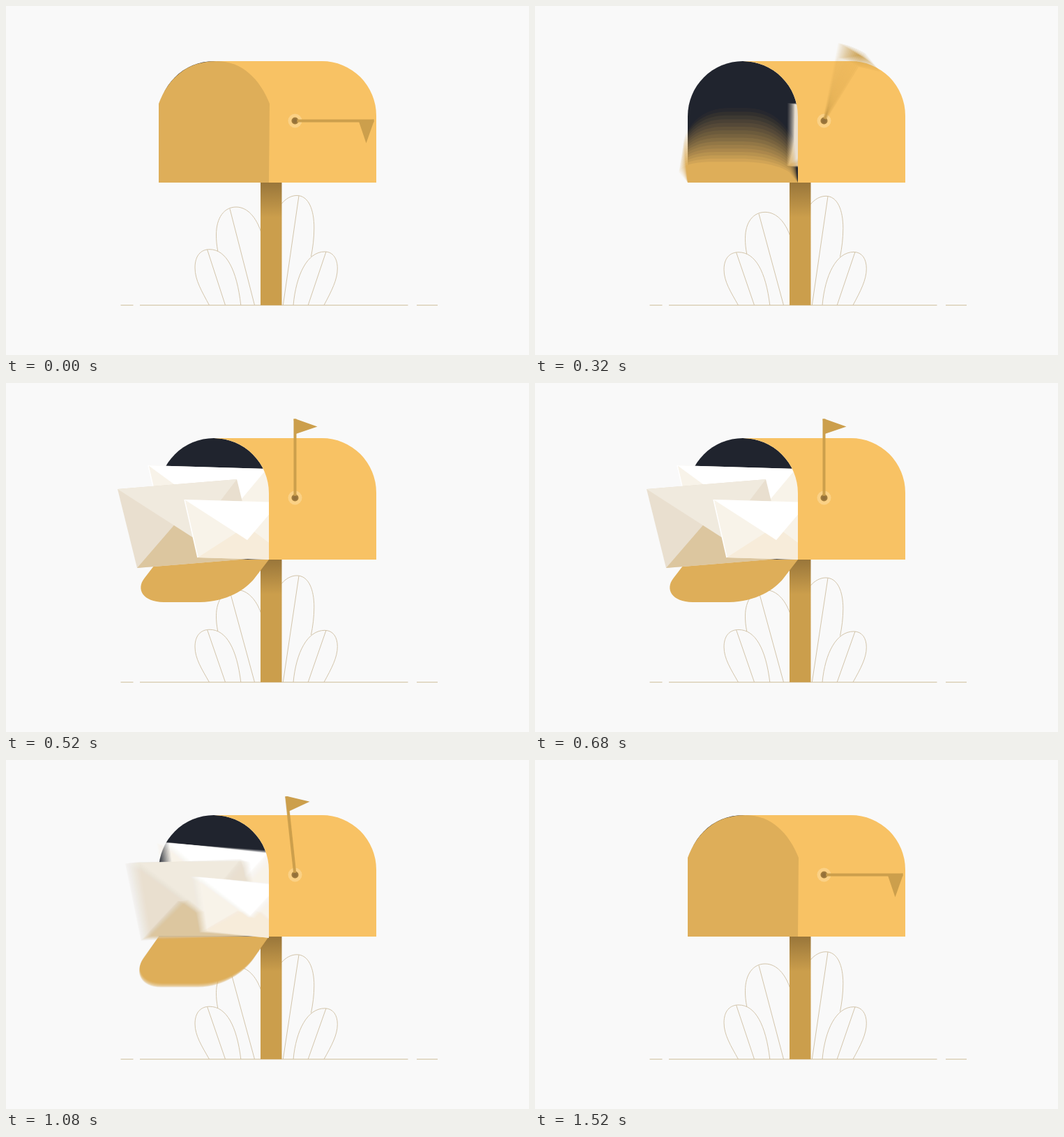
An HTML page with a canvas for the animation above (1560 ms loop, 750 by 500 pixels).

```html
<!DOCTYPE html>
<html lang="en">
<head>
<meta charset="utf-8">
<title>Mailbox</title>
<style>
html, body { margin: 0; height: 100%; overflow: hidden; background: #f9f9f9; }
canvas { display: block; width: 100vw; height: 100vh; }
</style>
</head>
<body>
<canvas id="stage" width="750" height="500"></canvas>
<script>
const LOOP = 1560, STEP = 40, SHUTTER = 12, SAMPLES = 16;
const GROUND = 428.7, HINGE = 253;
const view = document.getElementById('stage').getContext('2d');
const buffer = document.createElement('canvas');
buffer.width = 750;
buffer.height = 500;
const g = buffer.getContext('2d');

const clamp = v => Math.max(0, Math.min(1, v));
const rad = deg => deg * Math.PI / 180;

// Rises from 0 to 1 at time a, falls back at time b
const ramp = (t, a, b, span) => clamp(Math.min((t - a) / span, 1 - (t - b) / span));

// Ramp that swings past 1 before it rests there
function swing(t, a, b, over) {
  const w = 1 - ramp(t, a, b, 100);
  return 1 - w * w * ((over + 1) * w - over);
}

const flagUp = t => swing(t, 295, 1040, 1.4);
const lidOpen = t => swing(t, 300, 1040, 1);
const mailOut = t => {
  const u = ramp(t, 309, 1064, 110);
  return u * u * (3 - 2 * u);
};

const leftSway = t => .95 * Math.sin(Math.PI * t / LOOP) ** .3;
const rightSway = t => (1 - Math.cos(2 * Math.PI * t / 293)) / 2;

const leaves = [
  { top: 348.7, drop: 5, vein: [288.5, 348.7, 314.5], sway: leftSway,
    d: 'M291.5 428.7C281 409 271 393 271 375C271 358 279 348.7 292 348.7C316 348.7 331 378 336.8 428.7' },
  { top: 288, drop: 9, vein: [321, 290.5, 356.5], sway: leftSway,
    d: 'M303.8 351.5C302 342 301.5 335 301.5 328C301.5 303 313 288 330 288C347 288 359 304 365.5 323' },
  { top: 271.5, drop: 10.5, vein: [420, 271.8, 397.3], sway: rightSway,
    d: 'M395 283.5C401 276 409 271.5 417 271.5C434 271.5 441.8 292 441.8 318C441.8 333 440 346 437.5 359' },
  { top: 352, drop: 5.5, vein: [459, 352, 433.2], sway: rightSway,
    d: 'M412 428.7C416 385 432 352 457 352C469 352 475.3 362 475.3 376C475.3 392 467 408 456 428.7' }
];

const side = new Path2D('M298 79H453A78 78 0 0 1 531 157V253H377V158A79 79 0 0 0 298 79Z');
const mouth = new Path2D('M219 253V158A79 79 0 0 1 377 158V253Z');

// Corners: top left, top right, bottom left; tip of the flap, peak of the lower fold
const letters = [
  { tl: [204, 118], tr: [374, 123], bl: [228, 222], tip: [312, 197], peak: [303, 180],
    base: '#f8f3e9', fold: '#f7ead6', flap: '#fff', rim: true },
  { tl: [160, 152], tr: [331, 138], bl: [188, 265], tip: [267.5, 221], peak: [252, 191],
    base: '#e9dfcf', fold: '#dcc69f', flap: '#f0eade' },
  { tl: [256, 167], tr: [392, 171], bl: [275, 250], tip: [346, 225], peak: [345, 205],
    base: '#f8f3e9', fold: '#f7ecda', flap: '#fff', rim: true }
];

function fill(color, path) {
  g.fillStyle = color;
  g.fill(path);
}

function poly(color, ...pts) {
  const p = new Path2D();
  pts.forEach(([x, y]) => p.lineTo(x, y));
  p.closePath();
  fill(color, p);
}

function line(x1, y1, x2, y2) {
  g.beginPath();
  g.moveTo(x1, y1);
  g.lineTo(x2, y2);
  g.stroke();
}

function disc(color, x, y, r) {
  const p = new Path2D();
  p.arc(x, y, r, 0, 7);
  fill(color, p);
}

function drawLeaf({ top, drop, vein, sway, d }, t) {
  const k = 1 - drop * sway(t) / (GROUND - top);
  const p = new Path2D();
  p.addPath(new Path2D(d), new DOMMatrix([1, 0, 0, k, 0, GROUND * (1 - k)]));
  g.stroke(p);
  line(vein[0], GROUND + (vein[1] - GROUND) * k, vein[2], GROUND);
}

function drawGround(t) {
  g.lineWidth = 1;
  g.strokeStyle = '#d3c5ab';
  for (const leaf of leaves) drawLeaf(leaf, t);
  g.strokeStyle = '#cebd9b';
  for (const [a, b] of [[164.5, 182.5], [192, 576.5], [589, 619]]) line(a, GROUND, b, GROUND);

  const shade = g.createLinearGradient(0, HINGE, 0, 303);
  shade.addColorStop(0, '#99763a');
  shade.addColorStop(1, '#cb9e4c');
  g.fillStyle = shade;
  g.fillRect(365, HINGE, 30.5, GROUND - HINGE);
}

// The lid turns about its lower edge and gets squarer as it opens
function drawLid(open) {
  const m = clamp(open), mix = (a, b) => a + (b - a) * m;
  const skew = -.263 * open * open, rise = Math.cos(rad(110 * open));
  const top = mix(79, 75), shoulder = mix(140, 174), bend = mix(105, 129), lean = mix(13, 0);
  g.save();
  g.transform(1, 0, -skew, rise, HINGE * skew, HINGE * (1 - rise));
  g.beginPath();
  g.moveTo(219, HINGE);
  g.lineTo(219, shoulder);
  g.bezierCurveTo(219 + lean, bend, mix(258, 243), top, mix(302, 273), top);
  g.lineTo(mix(302, 325), top);
  g.bezierCurveTo(mix(339, 363), top, 377 - lean, bend, mix(378, 377), shoulder);
  g.lineTo(377, HINGE);
  g.fillStyle = '#deae59';
  g.fill();
  g.restore();
}

function drawLetter({ tl, tr, bl, tip, peak, base, fold, flap, rim }) {
  const br = [tr[0] + bl[0] - tl[0], tr[1] + bl[1] - tl[1]];
  poly(base, tl, tr, br, bl);
  poly(fold, bl, peak, br);
  poly(flap, tl, tr, tip);
  if (rim) {
    g.strokeStyle = '#fff';
    g.lineWidth = 1.5;
    line(...tl, ...bl);
  }
}

// Letters slide out from behind the side, growing and turning
function drawLetters(out) {
  const hidden = Math.sqrt(1 - out), size = 1 - .24 * hidden;
  g.save();
  g.beginPath();
  g.rect(0, 0, 377, 500);
  g.clip();
  g.translate(290 + 170 * (1 - out), 200);
  g.rotate(rad(15 * hidden));
  g.scale(size, size);
  g.translate(-290, -200);
  letters.forEach(drawLetter);
  g.restore();
}

function drawFlag(up) {
  const color = '#cc9f4c';
  g.save();
  g.translate(414.5, 164.5);
  disc('#fbd185', 0, 0, 10);
  disc('#a07a3c', 0, 0, 5);
  g.rotate(-up * Math.PI / 2);
  g.fillStyle = color;
  g.fillRect(1, -2, 112, 4);
  poly(color, [113, -2], [113, 1], [102, 32], [91.5, 1]);
  disc('#93703a', 0, 0, 3);
  g.restore();
}

function drawScene(t, groundTime) {
  const open = lidOpen(t), lowered = open > .82;
  g.fillStyle = '#f9f9f9';
  g.fillRect(0, 0, 750, 500);
  drawGround(groundTime);
  fill('#20242e', mouth);
  if (lowered) drawLid(open);
  drawLetters(mailOut(t));
  fill('#f8c264', side);
  if (!lowered) drawLid(open);
  drawFlag(flagUp(t));
}

// Average several moments across the shutter for motion blur
function render(t) {
  for (let i = 0; i < SAMPLES; i++) {
    drawScene(t + SHUTTER * ((i + .5) / SAMPLES - .5), t);
    view.globalAlpha = 1 / (i + 1);
    view.drawImage(buffer, 0, 0);
  }
}

const start = performance.now();
let shown = -1;
function tick() {
  const t = Math.floor((performance.now() - start) % LOOP / STEP) * STEP;
  if (t !== shown) render(shown = t);
  requestAnimationFrame(tick);
}
tick();
</script>
</body>
</html>
```
